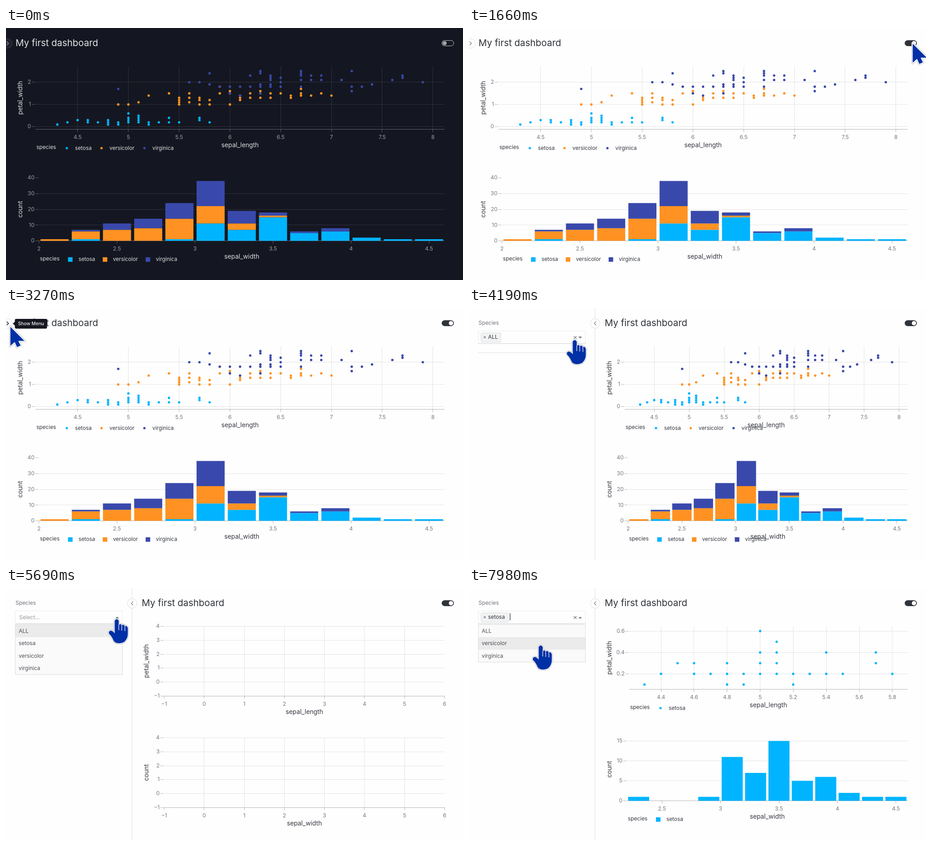
Animation, 1007 px wide and 556 px high, one loop 8000 ms. Source, as an HTML page with a canvas:

```html
<!DOCTYPE html>
<html lang="en">
<head>
<meta charset="utf-8">
<title>Dashboard</title>
<style>
  html, body { margin: 0; width: 100%; height: 100%; overflow: hidden; background: #fefefe; }
  canvas { display: block; }
</style>
</head>
<body>
<canvas id="stage" width="1007" height="556"></canvas>
<script>
const c = document.getElementById('stage').getContext('2d');
const LOOP = 8000, RIGHT = 966.5;
const COLORS = { setosa: '#00b4ff', versicolor: '#ff9222', virginica: '#3949ab' };
const SPECIES = Object.keys(COLORS);

// petal width -> sepal lengths
const POINTS = {
  setosa: {
    0.1: [4.3, 4.8, 4.9, 5.2],
    0.2: [4.4, 4.6, 4.7, 4.8, 4.9, 5, 5.1, 5.2, 5.3, 5.4, 5.5, 5.8],
    0.3: [4.5, 4.6, 4.8, 5, 5.1, 5.7], 0.4: [5, 5.1, 5.4, 5.7], 0.5: [5.1], 0.6: [5]
  },
  versicolor: {
    1: [4.9, 5, 5.5, 5.7, 5.8, 6], 1.1: [5.1, 5.5, 5.6], 1.2: [5.5, 5.7, 5.8, 6.1],
    1.3: [5.5, 5.6, 5.7, 6.1, 6.2, 6.3, 6.4, 6.6], 1.4: [5.2, 6.1, 6.6, 6.7, 6.8, 7],
    1.5: [5.4, 5.6, 5.9, 6, 6.2, 6.3, 6.4, 6.5, 6.7, 6.9], 1.6: [6, 6.3], 1.7: [6.7], 1.8: [5.9]
  },
  virginica: {
    1.4: [6.1], 1.5: [6, 6.3], 1.6: [7.2], 1.7: [4.9],
    1.8: [5.9, 6, 6.1, 6.2, 6.3, 6.4, 6.5, 6.7, 7.2, 7.3], 1.9: [5.8, 6.3, 6.4, 7.4],
    2: [5.6, 5.7, 6.5, 7.9], 2.1: [6.4, 6.7, 6.8, 6.9, 7.1, 7.6], 2.2: [6.4, 6.5, 7.7],
    2.3: [6.2, 6.4, 6.7, 6.8, 6.9, 7.7], 2.4: [5.8, 6.3, 6.7], 2.5: [6.3, 6.7, 7.2]
  }
};
// sepal width counts in bins of 0.2 starting at 2
const COUNTS = {
  setosa: [0, 1, 0, 0, 1, 11, 7, 15, 5, 6, 2, 1, 1],
  versicolor: [1, 5, 7, 8, 13, 11, 4, 1, 0, 0, 0, 0, 0],
  virginica: [0, 1, 4, 6, 10, 16, 8, 2, 1, 2, 0, 0, 0]
};
// start, end, x, y
const MOVES = [
  [330, 1130, 977, 33], [1820, 2620, 9, 40], [3540, 4110, 233, 70], [4860, 5300, 244, 68],
  [5930, 6250, 120, 126], [7060, 7620, 245, 69], [7860, 7980, 158, 126]
];

const ARROW = new Path2D('M0 0V45L10 36L15 47L24 43L19 33H33Z');
const HAND = new Path2D('M-4.5 4Q0 -3 4.5 4V14Q8 9 11 14Q14.5 11 18 16Q22 14 24.5 20V34Q24 42 20 47' +
  'Q16 54 5 54Q-5 54 -8 46Q-12 37 -17 33Q-19 27 -13 26Q-8 27 -4.5 32Z');
const KNUCKLES = new Path2D('M4.5 13V25M11 14V26M18 16V27');

const clamp = v => Math.max(0, Math.min(1, v));
const ease = v => { v = clamp(v); return v * v * (3 - 2 * v); };
const mix = (a, b, k) => a + (b - a) * k;
const range = (a, b, step) => Array.from({ length: Math.round((b - a) / step) + 1 }, (_, i) => +(a + i * step).toFixed(1));
const crisp = v => Math.floor(v) + .5;

let light = 0;
const shade = (from, to, a = 1) => `rgba(${from.map((v, i) => Math.round(mix(v, to[i], light)))},${a})`;
const DARK = [20, 23, 33], WHITE = [255, 255, 255];
const ink = a => shade(WHITE, DARK, a);
const paper = () => shade(DARK, [254, 254, 254]);

function text(s, x, y, size, color, align = 'left', weight = 400) {
  c.font = `${weight} ${size}px Inter, sans-serif`;
  c.textAlign = align;
  c.textBaseline = 'middle';
  c.fillStyle = color;
  c.fillText(s, x, y);
}
function line(x1, y1, x2, y2, color, width = 1) {
  c.beginPath();
  c.moveTo(x1, y1);
  c.lineTo(x2, y2);
  c.strokeStyle = color;
  c.lineWidth = width;
  c.stroke();
}
function box(x, y, w, h, fill, stroke, r = 0, width = 1) {
  c.beginPath();
  c.roundRect(x, y, w, h, r);
  if (fill) { c.fillStyle = fill; c.fill(); }
  if (stroke) { c.strokeStyle = stroke; c.lineWidth = width; c.stroke(); }
}
function dot(x, y, r, color) {
  c.beginPath();
  c.arc(x, y, r, 0, 7);
  c.fillStyle = color;
  c.fill();
}
function shape(points, color) {
  c.beginPath();
  points.forEach(p => c.lineTo(...p));
  c.fillStyle = color;
  c.fill();
}

function axes({ left, top, bottom, x, y, xTicks, yTicks, xName, yName, vertical, skipTop, panel }) {
  const label = v => String(v).replace('-', '−');
  for (const v of xTicks) {
    const px = crisp(x(v));
    if (vertical && px > left + 2 && px < RIGHT - 2) line(px, top, px, bottom, ink(.11));
    line(px, bottom, px, bottom + 6, ink(.3));
    text(label(v), x(v), bottom + 18, 11.9, ink(.58), 'center');
  }
  for (const v of yTicks) {
    const py = crisp(y(v));
    if (!(skipTop && v === yTicks[yTicks.length - 1]) && py < bottom - 1) line(left, py, RIGHT, py, ink(.11));
    line(left - 8, py, left - 1, py, ink(.3));
    text(label(v), left - 10, y(v), 11.9, ink(.58), 'right');
  }
  line(left, crisp(bottom), RIGHT, crisp(bottom), ink(.32));
  text(xName, (left + RIGHT) / 2, bottom + 35.5, 13.8, ink(.86), 'center');
  c.save();
  c.translate(panel + 32, (top + bottom) / 2);
  c.rotate(-Math.PI / 2);
  text(yName, 0, 0, 13.8, ink(.86), 'center');
  c.restore();
}

function legend(left, y, names, square) {
  text('species', left + 2, y, 11.9, ink(.86));
  names.forEach((name, i) => {
    const x = left + [69, 145.5, 240][i];
    if (square) box(x - 5, y - 3.5, 10, 10, COLORS[name]);
    else dot(x, y + 1.5, 2.6, COLORS[name]);
    text(name, left + [87, 163, 257.5][i], y + 1.5, 11.8, ink(.86));
  });
}

function emptyCharts(panel) {
  const left = panel + 70.5;
  for (const [top, xName, yName] of [[84.5, 'sepal_length', 'petal_width'], [330.5, 'sepal_width', 'count']]) {
    const x = v => left + (v + 1) * (RIGHT - left) / 7, y = v => top + (4 - v) * 30.75;
    axes({ left, top, bottom: top + 153.7, x, y, xTicks: range(-1, 6, 1), yTicks: range(-1, 4, 1),
      xName, yName, vertical: true, panel });
  }
}

function charts(panel, names) {
  const all = names.length > 1;

  let left = panel + (all ? 65 : 75);
  const pad = .05 * (RIGHT - left) + 3;
  const [lo, hi, yHi] = all ? [4.3, 7.9, 2.5] : [4.3, 5.8, .6];
  const x = v => left + pad + (v - lo) / (hi - lo) * (RIGHT - left - 2 * pad);
  const y = v => 95 + (yHi - v) / (yHi - .1) * 118;
  axes({ left, top: 84.5, bottom: 223.7, x, y, panel, vertical: true,
    xTicks: all ? range(4.5, 8, .5) : range(4.4, 5.8, .2), yTicks: all ? [0, 1, 2] : [.2, .4, .6],
    xName: 'sepal_length', yName: 'petal_width' });
  for (const name of names)
    for (const [w, lengths] of Object.entries(POINTS[name]))
      for (const l of lengths) dot(x(l), y(+w), 2.65, COLORS[name]);
  legend(left, 263.5, names);

  left = panel + (all ? 72.7 : 70);
  const first = all ? 0 : 1, bin = (RIGHT - left) / (13 - first), unit = 132 / (all ? 38 : 15);
  axes({ left, top: 330.5, bottom: 469.5, panel, skipTop: all,
    x: v => left + (v - 2 - first * .2) / .2 * bin, y: v => 469.7 - v * unit,
    xTicks: range(all ? 2 : 2.5, 4.5, .5), yTicks: all ? range(0, 40, 10) : range(0, 15, 5),
    xName: 'sepal_width', yName: 'count' });
  for (let i = first; i < 13; i++) {
    let base = 469.5;
    for (const name of names) {
      const h = COUNTS[name][i] * unit;
      box(left + (i - first + .05) * bin, base - h, bin * .9, h, COLORS[name]);
      base -= h;
    }
  }
  legend(left, 509.3, names, true);
}

function loader(y, age) {
  for (let i = 0; i < 5; i++) {
    const lift = Math.max(0, 1 - Math.abs(age - 200 - i * 100) / 100), h = 14 + 12 * lift;
    box(621 + i * 8.7, y - h / 2, 5, h, '#808080');
  }
}

function sidePanel(t, panel, cursor) {
  const open = t >= 5690 && t < 6580 || t >= 7700;
  const focus = !open && t >= 4520;
  const tag = t < 4520 ? 'ALL' : t < 6580 ? '' : 'setosa';
  c.save();
  c.beginPath();
  c.rect(0, 0, panel, 556);
  c.clip();
  text('Species', 21, 33.5, 11.9, ink(.6));
  line(20, 98.5, 256, 98.5, '#e0e0e0');
  box(20.5, 50.5, 236, 28, '#fefefe', '#ececec');
  line(20, 78.5, 257, 78.5, '#d2d2d2');
  if (focus) box(21, 51, 235, 26.5, null, '#66aee6', 1, 2);
  if (tag) {
    const w = tag === 'ALL' ? 44 : 60.5;
    box(26.5, 54.5, w, 21, '#f1f2f3', '#dedfe0', 2);
    text('×', 31, 65, 11, ink(.7));
    text(tag, 42, 64.5, 11.9, ink(.86));
    line(230.8, 61.8, 237.2, 68.2, ink(.6), 1.2);
    line(237.2, 61.8, 230.8, 68.2, ink(.6), 1.2);
  } else {
    text('Select...', 29, 65, 11.9, '#999');
  }
  shape(open ? [[241, 67], [249, 67], [245, 63]] : [[241, 63], [249, 63], [245, 67.5]], ink(.55));
  if (open) {
    const rows = ['ALL', ...SPECIES].filter(name => name === 'ALL' || name !== tag);
    const hover = Math.max(0, Math.floor((cursor.y - 81) / 27.5));
    box(20.5, 80.5, 236, rows.length * 27.5 + .5, '#fafafa', '#dcdcdc');
    box(21, 81 + hover * 27.5, 235, 27.5, '#ebebeb');
    rows.forEach((name, i) => text(name, 28, 95 + i * 27.5, 11.9, ink(.75)));
    if (tag) line(90.5, 56, 90.5, 71, '#222', 1.2);
  }
  c.restore();
  line(crisp(panel - 1), 0, crisp(panel - 1), 556, '#e2e2e2');
}

function header(t, panel) {
  text('My first dashboard', panel + 21, 33.5, 20.4, ink(.88));

  box(960.5, 27.5, 26, 12, ink(.88 * light), ink(.75), 6);
  dot(mix(966.5, 980.5, light), 33.5, light < .5 ? 4.6 : 4.8, light < .5 ? ink(.6) : '#fff');

  const x = panel + (panel ? 0 : 3.5), hover = t >= 2620 && t < 3620;
  c.beginPath();
  c.arc(x, 34, 10.5, 0, 7);
  c.fillStyle = shade([31, 34, 44], WHITE);
  c.fill();
  c.strokeStyle = ink(.15);
  c.lineWidth = 1;
  c.stroke();
  const d = panel > 139 ? -1 : 1;
  c.beginPath();
  c.moveTo(x - 2 * d, 30);
  c.lineTo(x + 2 * d, 34);
  c.lineTo(x - 2 * d, 38);
  c.strokeStyle = ink(hover ? .95 : .55);
  c.lineWidth = hover ? 1.7 : 1.3;
  c.stroke();

  const tip = Math.min(clamp((t - 2640) / 160), clamp((3400 - t) / 110));
  if (tip > 0) {
    c.globalAlpha = tip;
    box(19.5, 24, 71, 21.5, '#15161f', null, 3);
    shape([[15, 34.5], [20, 30], [20, 39]], '#15161f');
    text('Show Menu', 26.5, 34.5, 10.2, '#f2f2f2', 'left', 500);
    c.globalAlpha = 1;
  }
}

function cursorAt(t) {
  let x = 1012, y = 330;
  for (const [a, b, tx, ty] of MOVES) {
    const k = ease((t - a) / (b - a));
    x = mix(x, tx, k);
    y = mix(y, ty, k);
  }
  return { x, y };
}

function drawCursor(t, { x, y }) {
  const hand = t >= 4110 && t < 6580 || t >= 7560, path = hand ? HAND : ARROW;
  c.save();
  c.translate(x, y);
  c.lineJoin = 'round';
  for (const [color, width] of [['#9a9a9a', 4], ['#fff', 2.8]]) {
    c.strokeStyle = color;
    c.lineWidth = width;
    c.stroke(path);
  }
  c.fillStyle = '#0030a5';
  c.fill(path);
  c.lineWidth = 1.2;
  c.strokeStyle = '#fff';
  if (hand) c.stroke(KNUCKLES);
  else c.stroke(path);
  c.restore();
}

function draw(t) {
  light = clamp((t - 1480) / 160);
  const panel = 278 * ease((t - 3280) / 350);
  const cursor = cursorAt(t);
  c.fillStyle = paper();
  c.fillRect(0, 0, 1007, 556);

  const start = t >= 4560 && t < 4840 ? 4560 : t >= 6620 && t < 6860 ? 6620 : 0;
  c.globalAlpha = start ? .3 : 1;
  if (t >= 4840 && t < 6860) emptyCharts(panel);
  else charts(panel, t < 4840 ? SPECIES : ['setosa']);
  c.globalAlpha = 1;
  if (start) {
    loader(177, t - start);
    loader(423, t - start);
  }
  if (panel > 0) sidePanel(t, panel, cursor);
  header(t, panel);
  drawCursor(t, cursor);
}

function frame() {
  draw(performance.now() % LOOP);
  requestAnimationFrame(frame);
}
frame();
</script>
</body>
</html>
```
